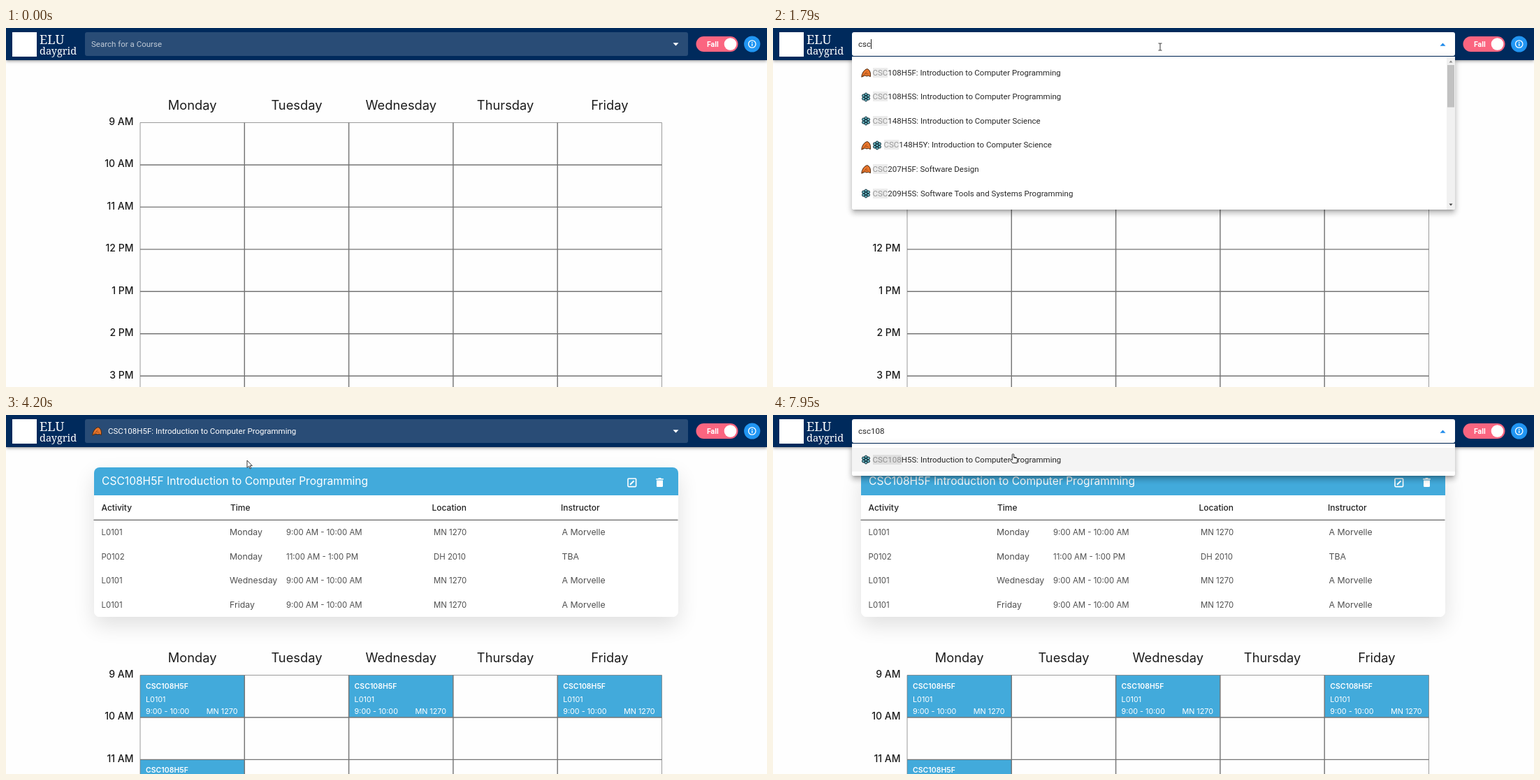
Recreate the animation shown at these times as an HTML page. Size 1089x514 px, loop 8 s.

```html
<!DOCTYPE html>
<html lang="en">
<head>
<meta charset="utf-8">
<title>Course timetable</title>
<style>
  html, body { margin: 0; width: 100%; height: 100%; overflow: hidden; background: #fff; }
  #stage { position: relative; width: 1089px; height: 514px; overflow: hidden; background: #fefefe; }
  #stage > * { position: absolute; }
  svg { display: block; }
  .layer { left: 0; top: 0; }
  .page text { font-family: Inter, sans-serif; fill: #1c1c1c; }
  .page .day { font-size: 18.3px; text-anchor: middle; }
  .page .hour { font-size: 14px; font-weight: 500; text-anchor: end; }
  .page .head { font-size: 12px; font-weight: 500; fill: #222; }
  .page .cell { font-size: 11.4px; fill: #505050; }
  .page .wide { font-size: 12.3px; fill: #505050; }
  .page .title { font-size: 15.6px; fill: #fff; }
  .page .slot { font-size: 10.8px; fill: #fff; }
  .page .code { font-size: 10.5px; font-weight: 600; fill: #fff; }
  .page .end { text-anchor: end; }
  #card { left: 125.5px; top: 75px; width: 836px; height: 214px; border-radius: 8px;
    background: linear-gradient(#42aadb 40px, #fff 40px); box-shadow: 0 12px 30px rgba(0,0,0,.12); }
  #bar { left: 0; top: 0; width: 1089px; height: 46px; background: #002a5c;
    box-shadow: 0 1.4px 2.9px -.7px rgba(0,0,0,.2), 0 2.9px 3.6px rgba(0,0,0,.14), 0 .7px 7.2px rgba(0,0,0,.12); }
  .brand { font-family: "Noto Serif", serif; fill: #fff; }
  #field, #menu { left: 113px; width: 863px; font: 11.52px Roboto, sans-serif; white-space: pre; }
  #field { top: 6px; height: 34px; border-radius: 3px; }
  #entry { position: absolute; left: 9px; top: 10px; height: 14px; line-height: 14px;
    display: flex; align-items: center; }
  #entry svg { margin: 0 9px 0 1px; }
  #entry.chosen { background: #aecdf2; }
  #entry.chosen u { text-decoration: underline wavy #c8324a .6px; text-underline-offset: 1px; }
  #entry u { text-decoration: none; }
  #caret { width: 0; height: 14px; border-left: 1px solid #222; margin-right: -1px; }
  #arrow { position: absolute; left: 841.2px; top: 14.6px; }
  #menu { top: 41px; max-height: 219px; overflow: hidden; background: #fff; color: rgba(0,0,0,.84);
    border-radius: 0 0 3px 3px; }
  #shade { left: 113px; top: 41px; width: 863px; border-radius: 0 0 3px 3px;
    box-shadow: 0 3.6px 3.6px -2.2px rgba(0,0,0,.2), 0 5.8px 7.2px .7px rgba(0,0,0,.14),
      0 2.2px 10px 1.4px rgba(0,0,0,.12); }
  .rows { padding: 5.8px 0; }
  .row { height: 34.56px; line-height: 34.56px; display: flex; align-items: center; padding-left: 12.5px; }
  .row svg { margin-right: 3px; }
  .row svg + svg { margin-left: -1px; }
  .row.hover { background: #f4f4f4; }
  .row.hover mark { background: #dfdfdf; }
  mark { background: #ececec; color: rgba(0,0,0,.36); }
  #scroll { position: absolute; right: 0; top: 0; }
</style>
</head>
<body>
<div id="stage">
  <div id="card"></div>
  <svg class="layer page" width="1089" height="514">
    <g id="details"></g>
    <g id="week"></g>
  </svg>
  <div id="bar">
    <svg width="1089" height="46">
      <rect x="9" y="6" width="35" height="35" fill="#fff"/>
      <text class="brand" x="48" y="23" font-size="18">ELU</text>
      <text class="brand" x="48" y="38" font-size="14.5">daygrid</text>
      <rect x="987.5" y="12" width="60" height="22" rx="11" fill="#fb6580"/>
      <text x="1003" y="27" font-family="Roboto, sans-serif" font-size="10.5" font-weight="700" fill="#fff">Fall</text>
      <circle cx="1036.5" cy="23" r="8.8" fill="#fff"/>
      <circle cx="1067.7" cy="23" r="11.6" fill="#2196f3"/>
      <circle cx="1067.7" cy="23" r="5.2" fill="none" stroke="#fff" stroke-width="1.3"/>
      <path d="M1067.7 22.4v3.4M1067.7 20v1.4" stroke="#fff" stroke-width="1.4"/>
    </svg>
  </div>
  <div id="field">
    <div id="entry"></div>
    <svg id="arrow" width="9" height="5"><path d="M.5 .3h8l-4 4.2z"/></svg>
  </div>
  <div id="shade"></div>
  <div id="menu"></div>
  <svg class="layer" width="1089" height="514">
    <g id="pointer">
      <circle id="halo" r="8.8" fill="#e8e614" fill-opacity=".66"/>
      <path id="arrowPtr" d="M0 0v10.4l2.5-2.2 1.7 3.7 1.5-.7-1.6-3.5h3.2z" fill="#fff" stroke="#222" stroke-width=".9"/>
      <path id="beam" d="M-2.5-5h2q.5 0 .5.8V4.2q0 .8-.5.8h-2M2.5-5h-2q-.5 0-.5.8M2.5 5h-2q-.5 0-.5-.8" fill="none" stroke="#333" stroke-width="1"/>
      <path id="hand" d="M-1.2.4Q0-.8 1.2.4V5l4.2 1q1 .4.9 1.6l-.7 5.2H-.6L-4 8.6q.2-1.6 1.6-.9l1.2 1z" fill="#fff" stroke="#222" stroke-width="1"/>
    </g>
  </svg>
</div>
<script>
const LOOP = 8000;
const $ = id => document.getElementById(id);
const text = (cls, x, y, s) => `<text class="${cls}" x="${x}" y="${y}">${s}</text>`;
const ramp = (t, a, b) => Math.min(1, Math.max(0, (t - a) / (b - a)));
const within = (t, spans) => spans.some(([a, b]) => t >= a && t < b);

// Timetable geometry
const LEFT = 192, TOP = 135.5, COL = 149.3, ROW = 60.45, SHIFT = 237;
const days = ['Monday', 'Tuesday', 'Wednesday', 'Thursday', 'Friday'];
const hours = ['9 AM', '10 AM', '11 AM', '12 PM', '1 PM', '2 PM', '3 PM'];

function block(col, row, span, section, time, room) {
  const x = LEFT + col * COL, y = TOP + row * ROW;
  return `<rect x="${x}" y="${y}" width="${COL}" height="${span * ROW}" fill="#42aadb"/>` +
    text('code', x + 8, y + 19, 'CSC108H5F') + text('slot', x + 8, y + 38.5, section) +
    text('slot', x + 8, y + 55.5, time) + text('slot end', x + 139.5, y + 55.5, room);
}

// Neighbouring cells each bring a border, so inner lines are twice as thick
const line = (d, outer) => `<path d="${d}" stroke="#757575" stroke-width="${outer ? .72 : 1.44}"/>`;

function buildWeek() {
  let lines = '';
  for (let i = 0; i < 10; i++) lines += line(`M${LEFT} ${TOP + i * ROW}h${5 * COL}`, i === 0);
  for (let i = 0; i < 6; i++) lines += line(`M${LEFT + i * COL} ${TOP}v${9 * ROW}`, i % 5 === 0);
  const lectures = [0, 2, 4].map(c => block(c, 0, 1, 'L0101', '9:00 - 10:00', 'MN 1270')).join('');
  const lab = block(0, 2, 2, 'P0102', '11:00 - 1:00', 'DH 2010');
  return `<g id="blocks">${lectures}${lab}</g>${lines}` +
    days.map((d, i) => text('day', LEFT + (i + .5) * COL, 117, d)).join('') +
    hours.map((h, i) => text('hour', 182.5, 139 + i * ROW, h)).join('');
}

function buildDetails() {
  const lecture = day => ['L0101', day, '9:00 AM - 10:00 AM', 'MN 1270', 'A Morvelle'];
  const rows = [lecture('Monday'), ['P0102', 'Monday', '11:00 AM - 1:00 PM', 'DH 2010', 'TBA'],
    lecture('Wednesday'), lecture('Friday')];
  const xs = [136.5, 320, 401, 612, 795.5];
  return text('title', 137, 99.5, 'CSC108H5F Introduction to Computer Programming') +
    text('head', 136.5, 137, 'Activity') + text('head', 321, 137, 'Time') +
    text('head', 609.5, 137, 'Location') + text('head', 794, 137, 'Instructor') +
    '<path d="M125.5 150.3h836" stroke="#666" stroke-width="1.2"/>' +
    rows.map((r, i) => r.map((s, j) =>
      text(j === 1 || j === 4 ? 'wide' : 'cell', xs[j], 172 + i * 34.56, s)).join('')).join('') +
    '<g fill="none" stroke="#fff" stroke-width="1.6"><rect x="890" y="91" width="11.6" height="11.6" rx="1"/>' +
    '<path d="M893 99.8l5.6-5.6" stroke-width="2"/></g>' +
    '<path d="M930.2 91h3l.8-1h3l.8 1h3v1.6h-10.6zM931 93.5h9v8.2q0 1.3-1.3 1.3h-6.4q-1.3 0-1.3-1.3z" fill="#fff"/>';
}

// Season icons
const leaf = `<svg width="14" height="14">
  <path d="M.8 13.2Q.6 10 3 6 5.400 2.200 8.800 1.500 12 2.600 13 6q.8 3 .4 6.600L10.600 11.400 8 12 5.600 11z" fill="#e8762c" stroke="#4a2a12"/>
  <path d="M1 13 8.500 5.500M6 8l4.500 1" fill="none" stroke="#8a4316" stroke-width=".7"/></svg>`;
const petals = [0, 1, 2, 3, 4, 5].map(i =>
  `<circle cx="7" cy="2.9" r="1.9" transform="rotate(${i * 60} 7 7)"/>`).join('');
const flake = `<svg width="14" height="14"><circle cx="7" cy="7" r="5" fill="#12333f"/>
  <g fill="#6fbcc6" stroke="#12333f">${petals}<circle cx="7" cy="7" r="1.9"/></g></svg>`;
const icons = { F: leaf, S: flake, Y: leaf + flake };
const iconFor = course => icons[course[8]];

const PICK = 'CSC108H5F: Introduction to Computer Programming';
const courses = [
  'ANT101H5S: Introduction to Biological Anthropology and Archaeology',
  'ANT102H5F: Introduction to Sociocultural and Linguistic Anthropology',
  'ANT200H5F: Introduction to the Practice of Archaeology',
  'ANT201H5S: World Prehistory',
  'ANT202H5F: Biological Anthropology: Human Variation and Adaption',
  'ANT203H5S: Biological Anthropology: Primatology and Palaeoanthropology',
  'ANT204H5F: Sociocultural Anthropology',
  'ANT312H5S: Special Topics in Archaeology',
  'ANT317H5F: Topics in Ancient Settlement',
  'BIO207H5F: Introductory Genetics',
  'BIO312H5S: Special Topics in Plant Physiology and Molecular Regulation',
  'BIO360H5F: Biometrics I',
  'BIO361H5S: Biometrics II',
  PICK,
  'CSC108H5S: Introduction to Computer Programming',
  'CSC148H5S: Introduction to Computer Science',
  'CSC148H5Y: Introduction to Computer Science',
  'CSC207H5F: Software Design',
  'CSC209H5S: Software Tools and Systems Programming',
  'CSC236H5F: Introduction to the Theory of Computation'
];

const scrollBar = `<svg id="scroll" width="12" height="219"><rect width="12" height="219" fill="#f1f1f1"/>
  <rect x="1" y="12" width="10" height="60.5" fill="#c1c1c1"/>
  <path d="M3.5 8.5h5l-2.5-3z" fill="#8a8a8a"/><path d="M3.5 210.5h5l-2.5 3z" fill="#444"/></svg>`;

function rowHtml(course, query, hover) {
  const at = course.toLowerCase().indexOf(query), end = at + query.length;
  const label = query
    ? `${course.slice(0, at)}<mark>${course.slice(at, end)}</mark>${course.slice(end)}` : course;
  return `<div class="row${hover ? ' hover' : ''}">${iconFor(course)}<span>${label}</span></div>`;
}

// Story: typed text over time, then pointer waypoints [time, x, y]
const typing = [[0, ''], [1310, 'c'], [1480, 'cs'], [1790, 'csc'], [2180, 'csc1'], [2330, 'csc10'],
  [2550, 'csc108'], [5750, 'c'], [5910, 'cs'], [6220, 'csc'], [6760, 'csc1'], [6930, 'csc10'], [7160, 'csc108']];
const path = [[70, 575, 350], [490, 553, 27], [700, 553, 27], [760, 554, 27], [3120, 554, 27], [3480, 352.5, 54],
  [3640, 346, 64], [4200, 345, 65], [4270, 345, 65], [4510, 346, 30], [4960, 346, 30], [5220, 348, 49],
  [7720, 348, 49], [7950, 343.5, 56]];
const clicks = [[520, 770], [3800, 3960], [4670, 4860]];
const BLINK = 535;

function pointerAt(t) {
  const i = path.findIndex(p => p[0] > t);
  if (i < 0) return path[path.length - 1].slice(1);
  if (!i) return null;
  const [t0, x0, y0] = path[i - 1], [t1, x1, y1] = path[i];
  let k = ramp(t, t0, t1);
  k = k * k * (3 - 2 * k);
  return [x0 + (x1 - x0) * k, y0 + (y1 - y0) * k];
}

const cache = {};
function fill(id, html) {
  if (cache[id] !== html) $(id).innerHTML = cache[id] = html;
}
const show = (id, on) => { $(id).style.display = on ? '' : 'none'; };

function render(t) {
  const [since, query] = typing.filter(s => s[0] <= t).pop();
  const showPick = t >= 3800 && t < 5750;
  const focused = within(t, [[560, 3870], [4720, LOOP]]);
  const white = ramp(t, 560, 840) - ramp(t, 3870, 4150) + ramp(t, 4720, 5000);
  const open = ramp(t, 760, 820) - ramp(t, 3870, 4010) + ramp(t, 4920, 4990);
  const turn = ramp(t, 780, 1080) - ramp(t, 3870, 4150) + ramp(t, 4920, 5220);
  const pos = pointerAt(t);

  // Page
  const added = t >= 4030;
  show('card', added);
  show('details', added);
  show('blocks', added);
  $('week').setAttribute('transform', `translate(0 ${added ? SHIFT : 0})`);

  // Search field
  const field = $('field').style;
  field.background = `rgba(255,255,255,${.16 + .84 * white})`;
  field.color = focused ? 'rgba(0,0,0,.85)' : '#fff';
  const from = since || 695;
  const caretOn = focused && !showPick && Math.floor((t - from + BLINK * 2) / BLINK) % 2 === 0;
  const caret = caretOn ? '<span id="caret"></span>' : '';
  let entry = query + caret;
  if (showPick) entry = leaf + `<span><u>${PICK.slice(0, 9)}</u>${PICK.slice(9)}</span>`;
  else if (!query) entry = caret + '<span style="opacity:.7">Search for a Course</span>';
  fill('entry', entry);
  $('entry').className = showPick && focused ? 'chosen' : '';
  const mix = (a, b) => Math.round(a + (b - a) * white);
  $('arrow').style.fill = `rgb(${mix(255, 33)},${mix(255, 140)},${mix(255, 235)})`;
  $('arrow').style.transform = `rotate(${turn * 180}deg)`;

  // Suggestions
  const key = showPick && t >= 4200 ? '' : query;
  const hits = courses.filter(c => c.toLowerCase().includes(key) && !(t >= 4200 && c === PICK));
  const height = Math.min(219, 11.6 + hits.length * 34.56);
  const over = pos && open > 0 && pos[1] > 46.8 && pos[1] < 41 + height;
  fill('menu', `<div class="rows">${hits.slice(0, 7).map((c, i) =>
    rowHtml(c, key, over && i === Math.floor((pos[1] - 46.8) / 34.56))).join('')}</div>` +
    (hits.length > 6 ? scrollBar : ''));
  $('menu').style.height = $('shade').style.height = height + 'px';
  $('menu').style.opacity = $('shade').style.opacity = open;
  show('menu', open > 0);
  show('shade', open > 0);

  // Pointer
  show('pointer', pos);
  if (pos) {
    const inField = pos[1] < 41;
    $('pointer').setAttribute('transform', `translate(${pos[0]} ${pos[1]})`);
    show('beam', inField);
    show('hand', !inField && over);
    show('arrowPtr', !inField && !over);
    show('halo', within(t, clicks));
  }
}

$('week').innerHTML = buildWeek();
$('details').innerHTML = buildDetails();
const start = performance.now();
function tick() {
  render((performance.now() - start) % LOOP);
  requestAnimationFrame(tick);
}
tick();
</script>
</body>
</html>
```
